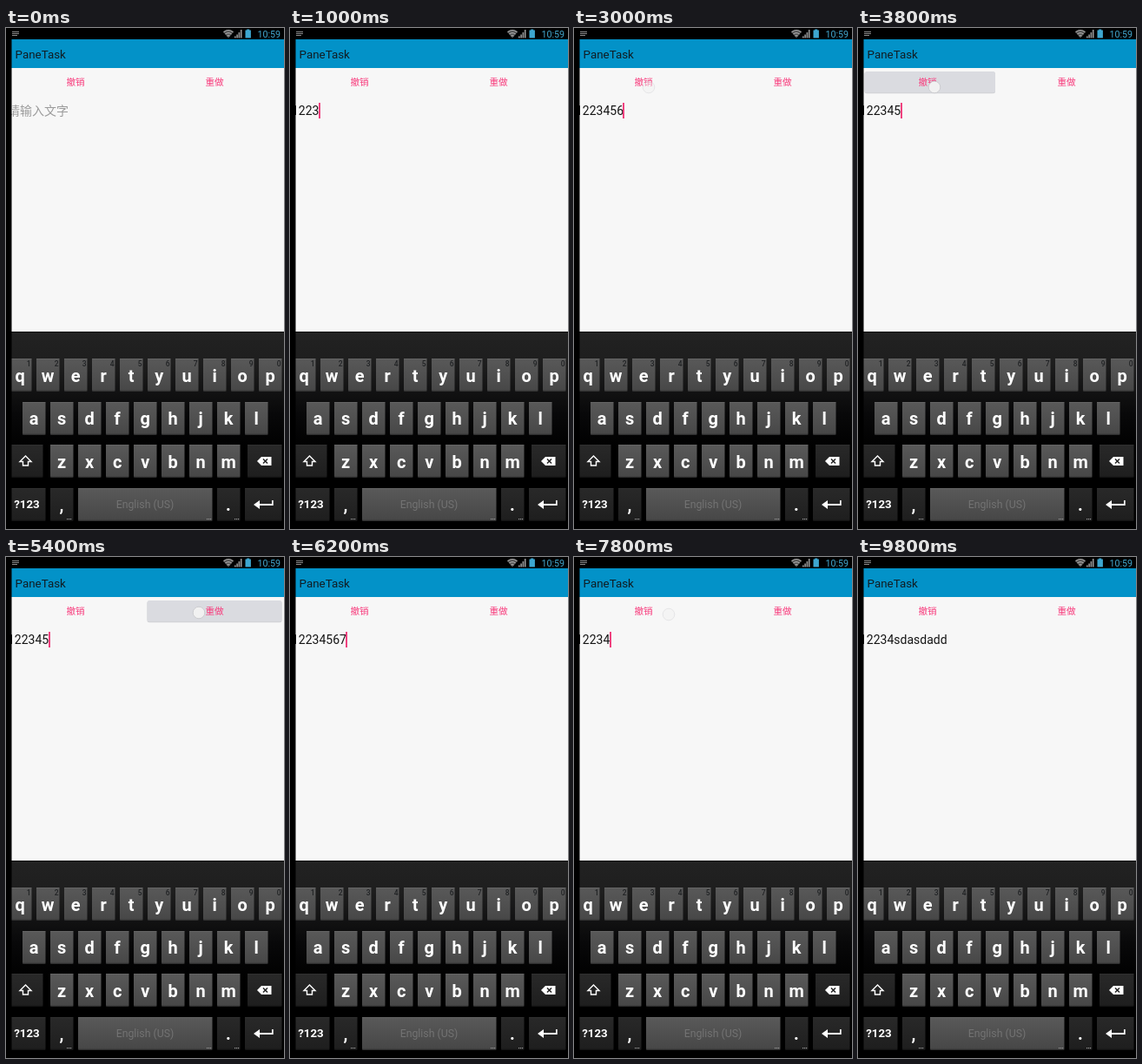
These frames come from a looping animation (320 by 576 pixels, 10 s). An HTML page:

```html
<!DOCTYPE html>
<html lang="zh-CN">
<head>
<meta charset="utf-8">
<style>
  html, body { margin: 0; width: 100%; height: 100%; overflow: hidden; background: #000; }
  svg { display: block; width: 100%; height: 100%; }
  text { font-family: Roboto, "Noto Sans CJK SC", "Noto Sans CJK", sans-serif; white-space: pre; }
  .action { font-size: 10.6px; font-weight: 500; fill: #f83b7c; text-anchor: middle; }
  .letter { font-size: 20px; font-weight: 700; fill: #fff; text-anchor: middle; }
  .digit { font-size: 8.5px; font-weight: 500; fill: #202224; text-anchor: end; }
  .small { font-size: 13.3px; font-weight: 700; fill: #fff; text-anchor: middle; }
  .space { font-size: 12.3px; fill: #737373; text-anchor: middle; }
</style>
</head>
<body>
<svg viewBox="0 0 320 576" preserveAspectRatio="none">
  <defs>
    <linearGradient id="board" x1="0" y1="0" x2="0" y2="1">
      <stop offset="0" stop-color="#222"/>
      <stop offset=".16" stop-color="#1e1e1e"/>
      <stop offset=".42" stop-color="#080809"/>
      <stop offset=".6" stop-color="#000"/>
    </linearGradient>
    <linearGradient id="light" x1="0" y1="0" x2="0" y2="1">
      <stop offset="0" stop-color="#595959"/>
      <stop offset="1" stop-color="#474747"/>
    </linearGradient>
    <linearGradient id="dark" x1="0" y1="0" x2="0" y2="1">
      <stop offset="0" stop-color="#292929"/>
      <stop offset="1" stop-color="#1e1e1e"/>
    </linearGradient>
  </defs>

  <rect width="320" height="576"/>
  <rect y="13" width="320" height="33" fill="#0392c8"/>
  <rect y="46" width="320" height="303" fill="#f7f7f7"/>
  <text x="10.5" y="35" font-size="13.4" fill="#101c22">PaneTask</text>

  <!-- status bar -->
  <path d="M250 4.5Q256 -.5 262 4.5L256 11.5Z" fill="#555"/>
  <path d="M250.5 4.8Q256 .2 261.5 4.8M252.5 7Q256 4.2 259.5 7M254.5 9.2Q256 8 257.5 9.2" fill="none" stroke="#a5a5a5" stroke-width="1.2"/>
  <path d="M263 11.5v-2h1.6v2zM265.3 11.5v-4h1.6v4zM267.6 11.5v-6.5h1.6v6.5zM269.9 11.5v-9.5h1.6v9.5z" fill="#999"/>
  <path d="M275.5 2.5h1.7v-1h3v1h1.7v9h-6.4z" fill="#3ea7d0"/>
  <text x="316" y="11" font-size="10.7" fill="#43a9d0" text-anchor="end">10:59</text>

  <!-- editor -->
  <g id="press">
    <rect y="50.5" width="151" height="24.7" rx="2.5" fill="#cfd0d4"/>
    <rect y="50" width="151" height="24.3" rx="2.5" fill="#dadbe0"/>
  </g>
  <text class="action" x="80" y="66">撤销</text>
  <text class="action" x="240" y="66">重做</text>
  <text id="entry" x="2" y="100" font-size="14"></text>
  <rect id="caret" y="86" width="2" height="18" fill="#f0427f"/>
  <circle id="touch" r="6.8" fill="#f1f1f1" stroke="#c6c6c9" stroke-width=".8"/>

  <!-- keyboard -->
  <rect y="349" width="320" height="227" fill="url(#board)"/>
  <rect y="349" width="320" height="1" fill="#111"/>
  <g id="keys"></g>
  <path d="M22.5 492l6.5 6.5h-3.5v4.5h-6v-4.5h-3.5z" fill="none" stroke="#fff" stroke-width="1.4"/>
  <path d="M289 498l5-5h11.5v10h-11.5z" fill="#fff"/>
  <path d="M296 495.5l5 5m0-5l-5 5" stroke="#222" stroke-width="1.5"/>
  <path d="M285 548l7-5v4h14v-4h1.7v6h-15.7v4z" fill="#fff"/>

  <rect width="6.5" height="576"/>
  <path d="M7 4.5h8M7 6.5h8M7 8.5h6" stroke="#8b8b8b" fill="none"/>
</svg>

<script>
const $ = id => document.getElementById(id);
const LOOP = 10000;

function set(node, attrs) {
  for (const name in attrs) node.setAttribute(name, attrs[name]);
}

function add(tag, attrs, label = "") {
  const node = document.createElementNS("http://www.w3.org/2000/svg", tag);
  set(node, attrs);
  node.textContent = label;
  $("keys").append(node);
}

function key(x, y, width, tone) {
  const [top, bottom] = tone === "light" ? ["#646464", "#3a3a3a"] : ["#303030", "#191919"];
  add("rect", { x, y, width, height: 37.5, rx: 1.5, fill: `url(#${tone})` });
  add("rect", { x, y, width, height: 1, fill: top });
  add("rect", { x, y: y + 36.5, width, height: 1, fill: bottom });
}

function row(letters, x, y, baseline, numbered) {
  [...letters].forEach((letter, i) => {
    const left = x + i * 32;
    key(left, y, 26.5, "light");
    add("text", { class: "letter", x: left + 13.2, y: baseline }, letter);
    if (numbered) add("text", { class: "digit", x: left + 25.5, y: y + 9 }, String((i + 1) % 10));
  });
}

function more(x) {
  for (let i = 0; i < 3; i++) add("rect", { x: x + i * 2, y: 564, width: 1.2, height: 1.2, fill: "#999" });
}

row("qwertyuiop", 3, 380, 407, true);
row("asdfghjkl", 19, 430, 456);
row("zxcvbnm", 51, 479, 506);
key(3, 479, 39.5, "dark");
key(278, 479, 39.5, "dark");
key(3, 529, 42.5, "dark");
key(51, 529, 26.5, "dark");
key(83, 529, 154.5, "light");
key(243, 529, 26.5, "dark");
key(275, 529, 42.5, "dark");
add("text", { class: "small", x: 24, y: 552 }, "?123");
add("text", { class: "letter", x: 64, y: 555 }, ",");
add("text", { class: "letter", x: 256, y: 555 }, ".");
add("text", { class: "space", x: 160, y: 552 }, "English (US)");
[70, 231, 263].forEach(more);

const DIGITS = "1223456787", WORD = "12234sdasdadd";
const BUTTONS = { undo: [7.5, 150.5], redo: [162.5, 155] };
const steps = [];

function step(t, text, caret, side, touch) {
  steps.push({ t, text, caret, side, touch });
}

function type(t, source, from, to) {
  for (let n = from; n <= to; n++, t += 200) step(t, source.slice(0, n), true);
}

const hold = (t, count, side, x, y) => step(t, DIGITS.slice(0, count), true, side, [x, y, 1]);
const lift = (t, count, x, y) => step(t, DIGITS.slice(0, count), true, "", [x, y, 0.45]);

step(0, "", false);
type(400, DIGITS, 1, 8);
step(2400, DIGITS.slice(0, 8), false);

hold(2800, 8, "undo", 86, 68);
lift(3000, 7, 86, 68);
hold(3400, 7, "undo", 87, 68);
lift(3600, 6, 88, 68);
hold(3800, 6, "undo", 88, 68);
lift(4000, 5, 88, 68);
hold(4200, 5, "undo", 88, 68);
lift(4400, 4, 88, 68);

hold(4800, 4, "redo", 222, 64);
lift(5000, 5, 222, 64);
lift(5200, 6, 222, 64);
hold(5400, 6, "redo", 222, 64);
lift(5600, 7, 222, 64);
hold(5800, 7, "redo", 222, 64);
lift(6000, 8, 222, 64);

type(6200, DIGITS, 8, 10);
step(6800, DIGITS, false);
step(7000, DIGITS, false, "undo", [108, 66, 1]);
lift(7200, 9, 108, 66);
hold(7400, 7, "undo", 109, 66);
hold(7600, 6, "undo", 109, 66);
lift(7800, 5, 109, 66);

type(8000, WORD, 5, 13);
step(9800, WORD, false);

const show = (node, on) => set(node, { visibility: on ? "visible" : "hidden" });
let current;

function draw(time) {
  const now = steps.findLast(s => s.t <= time);
  if (now === current) return;
  current = now;

  const entry = $("entry");
  entry.textContent = now.text || "请输入文字";
  set(entry, { fill: now.text ? "#151515" : "#9b9b9b" });
  set($("caret"), { x: Math.round(1.4 + entry.getComputedTextLength()) });
  show($("caret"), now.caret);

  show($("press"), now.side);
  if (now.side) {
    const [x, width] = BUTTONS[now.side];
    for (const rect of $("press").children) set(rect, { x, width });
  }

  show($("touch"), now.touch);
  if (now.touch) {
    const [cx, cy, opacity] = now.touch;
    set($("touch"), { cx, cy, opacity });
  }
}

const start = performance.now();
function tick() {
  draw((performance.now() - start) % LOOP);
  requestAnimationFrame(tick);
}
tick();
</script>
</body>
</html>
```
